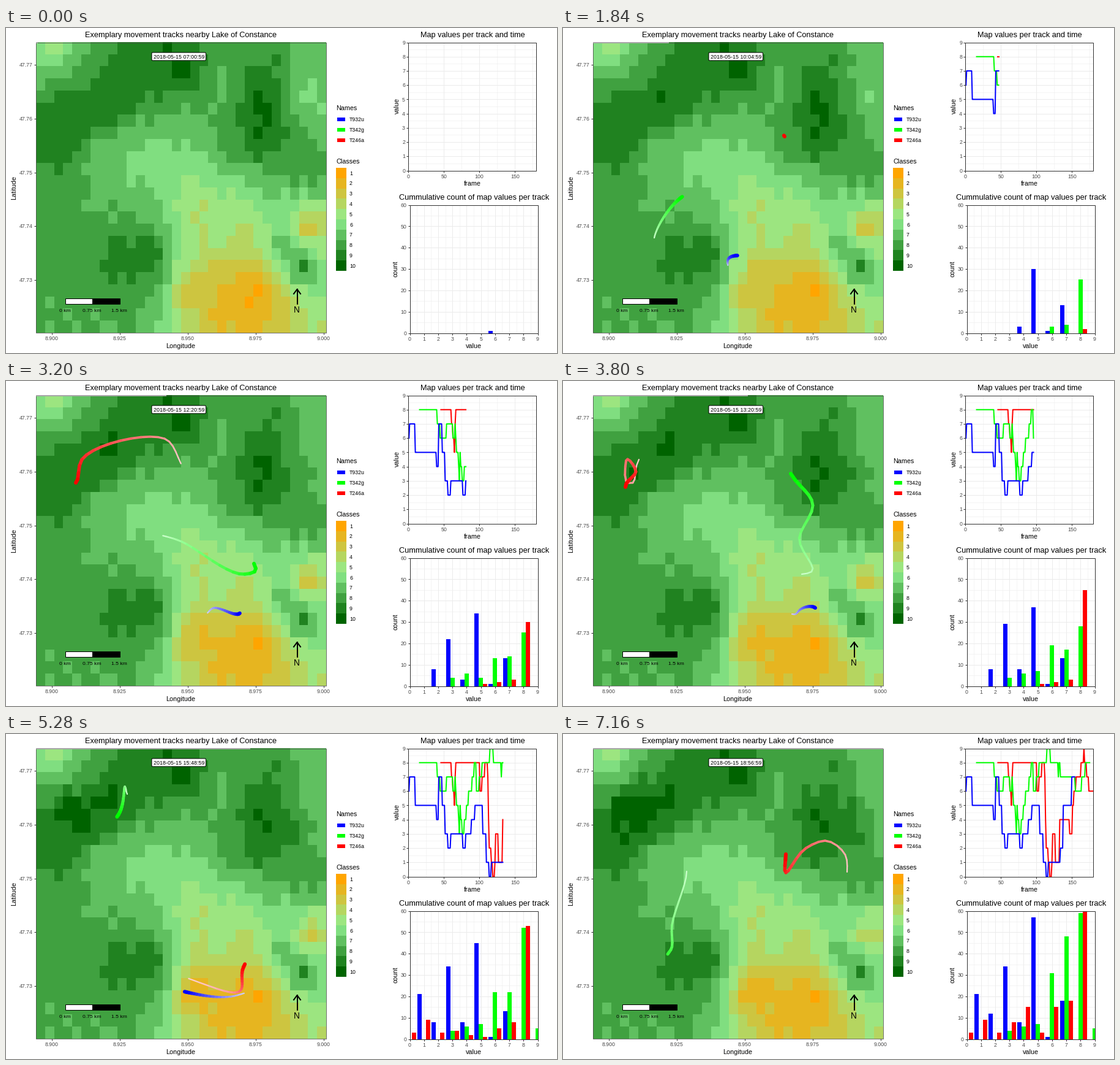
A matplotlib script for the animation above (7.2 s loop, 900 px wide and 530 px high).

```python
import numpy as np
import matplotlib.pyplot as plt
from matplotlib.animation import FuncAnimation
from matplotlib.collections import LineCollection
from matplotlib.patches import FancyBboxPatch, Rectangle

W, H, DPI = 900, 530, 100
FRAMES, TAIL = 180, 19
PT = 72 / DPI
COLS, ROWS = 32, 24
INK, GREY, GRID = "#333333", "#4d4d4d", "#ebebeb"

plt.rcParams["font.family"] = "Liberation Sans"
fig = plt.figure(figsize=(W / DPI, H / DPI), dpi=DPI, facecolor="white")
ax = fig.add_axes([0, 0, 1, 1])
ax.axis("off")


# ---- land cover: (column, row, class) control points ----
LAND = np.array([
    (2, 0, 5), (9, 2, 9), (16, 2, 9.9), (20, 2, 7), (25, 2, 9), (30, 0, 7),
    (8, 4, 9.7), (2, 4, 9), (19, 5, 7.2), (24.5, 5, 10.2), (29, 4, 6.3),
    (16, 6, 7), (4, 8, 9), (12.5, 8, 6), (20, 8, 7.8), (24, 8, 9),
    (6, 9, 6.4), (30, 11, 8), (3, 12, 8), (10, 13, 7), (17.5, 13.5, 4),
    (22.5, 14.5, 4), (29.5, 15, 2.2), (26.5, 16, 7), (10, 17, 9.2),
    (13, 17, 8.7), (20, 16, 5.5), (29, 18, 8.7), (14, 19, 6.5),
    (16, 20, 2.8), (19, 18, 3.2), (24.5, 20, 1), (29, 20, 5.5), (24, 22, 2),
    (14.5, 23, 6), (5, 21, 7.8)])

# change over one loop: (column, row, amount)
DRIFT = [(4.5, 5, 1), (24.5, 4, -.8), (28.5, 5, 1.4), (17, 19, -.9),
         (29.5, 15, .7), (24, 20, .4)]

gx, gy = np.meshgrid(np.arange(COLS), np.arange(ROWS))


def spread(x, y):
    return np.hypot(np.subtract.outer(x, LAND[:, 0]),
                    np.subtract.outer(y, LAND[:, 1]))


weights = np.linalg.solve(spread(LAND[:, 0], LAND[:, 1]), LAND[:, 2] - 7)
land = 7 + spread(gx, gy) @ weights
land += np.random.default_rng(4).uniform(-.28, .28, land.shape)
drift = sum(d * np.exp(-((gx - c) ** 2 + (gy - r) ** 2) / 6)
            for c, r, d in DRIFT)

ORANGE, LIGHT, DARK = np.array([(255, 165, 0), (144, 238, 144),
                                (0, 100, 0)]) / 255
PALETTE = np.array([ORANGE + (LIGHT - ORANGE) * u if u < 1
                    else LIGHT + (DARK - LIGHT) * (u - 1)
                    for u in np.linspace(0, 2, 10)])


def classes(n):
    k = np.rint(land + drift * n / (FRAMES - 1)).astype(int)
    return PALETTE[np.clip(k, 1, 10) - 1]


# ---- tracks ----
def smooth(t, knots, v):
    """Cubic Hermite curve through the knots."""
    m = np.gradient(v, knots)
    i = np.clip(np.searchsorted(knots, t, "right") - 1, 0, len(knots) - 2)
    h = knots[i + 1] - knots[i]
    u = np.clip((t - knots[i]) / h, 0, 1)
    return (v[i] * (1 + 2 * u) * (1 - u) ** 2 + v[i + 1] * u * u * (3 - 2 * u)
            + h * u * (1 - u) * (m[i] * (1 - u) - m[i + 1] * u))


class Track:
    """Values as (value, length) runs, path as (step, x, y) way points."""

    def __init__(self, name, color, runs, way):
        values, lengths = zip(*runs)
        step, x, y = np.array(way, float).T
        self.name, self.color = name, np.array(color)
        self.start = int(step[0])
        self.values = np.repeat(values, lengths)
        self.end = self.start + len(self.values) - 1
        steps = np.arange(FRAMES + 1)
        self.path = np.column_stack([smooth(steps, step, x),
                                     smooth(steps, step, y)])

    def seen(self, now):
        return self.values[:max(0, now - self.start + 1)]


blue = Track(
    "T932u", (0, 0, 1),
    [(6, 1), (7, 8), (5, 30), (4, 3), (7, 5), (5, 4), (3, 4), (2, 4), (3, 17),
     (2, 4), (3, 8), (4, 5), (5, 11), (3, 5), (1, 4), (0, 3), (1, 17), (2, 4),
     (5, 12), (7, 5)],
    [(1, 252, 412), (5, 254, 407), (11, 260, 391), (17, 268, 390),
     (24, 269, 389), (48, 288, 371), (53, 308, 372), (58, 321, 382),
     (67, 340, 370), (77, 374, 380), (80, 380, 380), (84, 387, 373),
     (96, 412, 370), (100, 416, 376), (106, 412, 397), (111, 403, 416),
     (116, 378, 426), (132, 295, 421), (141, 274, 413), (147, 260, 414),
     (151, 256, 422), (154, 255, 425)])

green = Track(
    "T342g", (0, 1, 0),
    [(8, 25), (7, 4), (6, 9), (7, 9), (6, 3), (7, 1), (6, 1), (5, 3), (4, 1),
     (3, 1), (5, 1), (4, 2), (3, 3), (4, 3), (5, 3), (6, 5), (7, 3), (8, 3),
     (6, 4), (7, 4), (8, 11), (9, 5), (8, 11), (7, 1), (8, 2), (7, 21),
     (6, 9), (7, 5), (8, 7)],
    [(16, 161, 363), (24, 149, 352), (48, 198, 273), (53, 216, 264),
     (58, 233, 245), (60, 245, 249), (67, 287, 262), (77, 390, 315),
     (79, 406, 311), (85, 386, 256), (90, 408, 203), (96, 372, 151),
     (98, 358, 126), (100, 330, 114), (105, 277, 96), (114, 198, 98),
     (116, 196, 90), (132, 184, 131), (143, 147, 180), (151, 149, 184),
     (161, 202, 224), (168, 178, 312), (172, 178, 347), (175, 171, 359)])

red = Track(
    "T246a", (1, 0, 0),
    [(8, 15), (7, 2), (6, 2), (5, 1), (7, 1), (8, 34), (6, 3), (7, 4), (8, 4),
     (7, 1), (4, 1), (2, 3), (1, 2), (0, 3), (1, 1), (3, 4), (1, 6), (4, 14),
     (3, 4), (5, 2), (6, 3), (7, 7), (8, 4), (9, 1), (8, 3), (7, 3), (6, 7)],
    [(46, 362, 177), (51, 355, 169), (56, 330, 166), (60, 297, 150),
     (67, 259, 94), (77, 124, 128), (81, 114, 166), (83, 103, 163),
     (86, 103, 130), (91, 119, 148), (96, 102, 173), (98, 106, 186),
     (101, 137, 211), (103, 148, 248), (107, 189, 315), (112, 263, 382),
     (116, 332, 411), (132, 388, 380), (139, 398, 342), (144, 384, 318),
     (151, 421, 309), (161, 464, 225), (164, 461, 197), (168, 428, 174),
     (171, 397, 186), (176, 364, 226), (180, 364, 196)])


# ---- drawing helpers ----
def label(x, y, s, size, color="black", ha="center", turn=False):
    if turn:
        return ax.text(x, y, s, size=size * PT, color=color, rotation=90,
                       ha="center", va="center", zorder=8)
    return ax.text(x, y + .36 * size, s, size=size * PT, color=color, ha=ha,
                   va="baseline", zorder=8)


def lines(segs, color, width, z):
    ax.add_collection(LineCollection(segs, colors=[color],
                                     linewidths=width * PT, zorder=z),
                      autolim=False)


def box(x0, y0, x1, y1, **kw):
    return ax.add_patch(Rectangle((x0, y0), x1 - x0, y1 - y0, **kw))


def axis_ticks(left, bottom, xs, ys):
    """xs and ys hold (position, text) pairs."""
    lines([[(x, bottom), (x, bottom + 3)] for x, _ in xs]
          + [[(left - 3, y), (left, y)] for y, _ in ys], INK, 1, 6)
    for x, s in xs:
        label(x, bottom + 9, s, 8.8, GREY)
    for y, s in ys:
        label(left - 5, y, s, 8.8, GREY, "right")


class Panel:
    def __init__(self, x0, y0, size, xmax, ymax, xstep, ystep):
        x1, y1 = x0 + size, y0 + size
        self.x0, self.y1 = x0, y1
        self.sx, self.sy = size / xmax, size / ymax
        for div, width in ((2, .5), (1, 1)):
            xs = self.x(np.arange(0, xmax + .01, xstep / div))
            ys = self.y(np.arange(0, ymax + .01, ystep / div))
            lines([[(x, y0), (x, y1)] for x in xs]
                  + [[(x0, y), (x1, y)] for y in ys], GRID, width, 1)
        axis_ticks(x0, y1,
                   [(self.x(v), str(v)) for v in range(0, xmax + 1, xstep)],
                   [(self.y(v), str(v)) for v in range(0, ymax + 1, ystep)])
        self.frame = box(x0, y0, x1, y1, fc="none", ec=INK, lw=PT, zorder=6)

    def x(self, v):
        return self.x0 + self.sx * v

    def y(self, v):
        return self.y1 - self.sy * v


# ---- map ----
L, T, R, B = 49, 23.5, 523, 497
raster = ax.imshow(classes(0), extent=(L, R, B, T), aspect="auto",
                   interpolation="nearest", zorder=1)
ax.set_xlim(0, W)
ax.set_ylim(H, 0)
box(L, T, R, B, fc="none", ec=GREY, lw=.8 * PT, zorder=3)
axis_ticks(L, B,
           [(75 + 110.9 * i, f"{8.9 + .025 * i:.3f}") for i in range(5)],
           [(60 + 87.75 * i, f"{47.77 - .01 * i:.2f}") for i in range(5)])
progress, = ax.plot([], [], color="#a6a6a6", lw=2 * PT,
                    solid_capstyle="butt", zorder=4)

label(285.5, 10.5, "Exemplary movement tracks nearby Lake of Constance", 12.8)
label(285.5, 518.5, "Longitude", 10.8)
label(13, 260, "Latitude", 10.8, turn=True)

ax.add_patch(FancyBboxPatch((239, 41), 86.5, 11,
                            boxstyle="round,pad=1,rounding_size=1.5",
                            fc="white", ec="black", lw=PT, zorder=7))
clock = label(282.3, 47, "", 8.9)

for i, fill in enumerate(("white", "black")):
    x = 96.5 + 44.5 * i
    box(x, 441, x + 44.5, 449.5, fc=fill, ec="black", lw=PT, zorder=3)
for i, s in enumerate(("0 km", "0.75 km", "1.5 km")):
    label(96 + 44.4 * i, 460, s, 8.5)
ax.plot([475.5, 475.5], [450, 426], color="black", lw=2 * PT, zorder=3)
ax.plot([470, 475.5, 481], [433.5, 426, 433.5], color="black", lw=2 * PT,
        zorder=3)
label(475, 459.5, "N", 13.8)

# ---- legends ----
label(539, 130.5, "Names", 10.8, ha="left")
for i, t in enumerate((blue, green, red)):
    y = 149 + 17 * i
    box(540.5, y - 3, 554, y + 3, fc=t.color, lw=0)
    label(561, y, t.name, 8.8, ha="left")

label(539, 217.5, "Classes", 10.8, ha="left")
for i, c in enumerate(PALETTE):
    y = 228 + 16.8 * i
    box(539, y, 556, y + 16.8, fc=c, lw=0, antialiased=False)
    label(561, y + 8.4, str(i + 1), 8.8, ha="left")

# ---- charts ----
series = Panel(657, 23.5, 209, 180, 9, 50, 1)
label(762, 10.5, "Map values per track and time", 12.8)
label(762, 253.5, "frame", 10.8)
label(638.5, 127, "value", 10.8, turn=True)

counts = Panel(659.5, 288.5, 209, 9, 60, 1, 10)
label(765, 275.5, "Cummulative count of map values per track", 12.8)
label(764, 518.5, "value", 10.8)
label(636.5, 393, "count", 10.8, turn=True)

TRACKS = (red, green, blue)
for k, t in enumerate(TRACKS):
    t.trail = LineCollection([], capstyle="round", zorder=2)
    ax.add_collection(t.trail, autolim=False)
    t.curve, = ax.plot([], [], color=t.color, lw=2 * PT, zorder=3)
    t.curve.set_clip_path(series.frame)
    t.bars = []
    for v in range(10):
        left = v + .15 - .3 * k
        b = box(counts.x(left), counts.y1, counts.x(left + .3), counts.y1,
                fc=t.color, lw=0, zorder=3)
        b.set_clip_path(counts.frame)
        t.bars.append(b)


def draw_trail(t, now):
    first, last = max(t.start, now - TAIL), min(t.end, now)
    if last <= first:
        t.trail.set_segments([])
        return
    pts = t.path[first:last + 1]
    fresh = 1 - (now - np.arange(first + 1, last + 1)) / TAIL
    t.trail.set_segments(np.stack([pts[:-1], pts[1:]], axis=1))
    t.trail.set_linewidths((2 + 4 * fresh) * PT)
    shade = (.15 + .85 * fresh)[:, None]
    t.trail.set_color(1 - shade * (1 - t.color))


def update(n):
    now = n + 1
    raster.set_data(classes(n))
    progress.set_data([L, L + (R - L) * now / FRAMES], [24, 24])
    hour, minute = divmod(7 * 60 + 4 * n, 60)
    clock.set_text(f"2018-05-15 {hour:02d}:{minute:02d}:59")
    for t in TRACKS:
        draw_trail(t, now)
        v = t.seen(now)
        t.curve.set_data(series.x(t.start + np.arange(len(v))), series.y(v))
        for b, c in zip(t.bars, np.bincount(v, minlength=10)):
            b.set_height(-counts.sy * c)
    return []


anim = FuncAnimation(fig, update, frames=FRAMES, interval=40, repeat=True,
                     repeat_delay=0, init_func=lambda: update(0))
plt.show()
```
